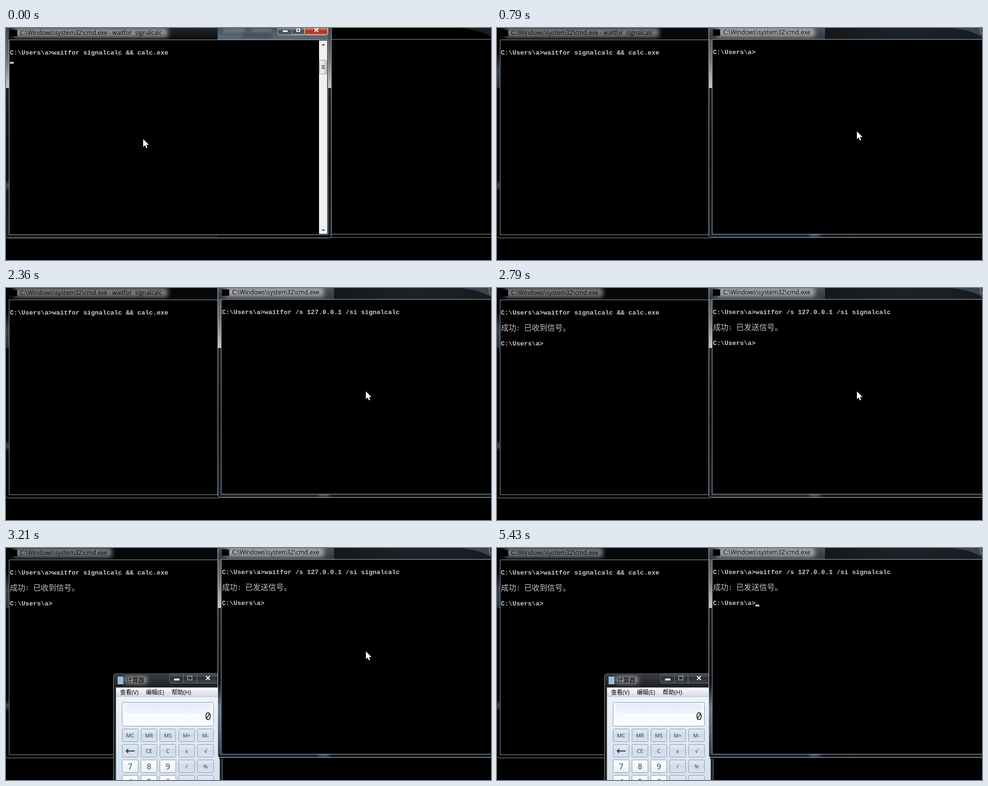
An HTML page with a canvas for the animation above (5480 ms loop, 1004 by 480 pixels).

```html
<!DOCTYPE html>
<html lang="zh-CN">
<head>
<meta charset="utf-8">
<title>waitfor</title>
<style>
html, body { margin: 0; width: 100%; height: 100%; overflow: hidden; background: #000; }
canvas { display: block; }
</style>
</head>
<body>
<canvas id="stage" width="1004" height="480"></canvas>
<script>
const LOOP = 5480;
const FRONT_SWAP = 790, PASTE = 1620, DONE = 2790, CALC_IN = 3070, CALC_FULL = 3210;
const UI = '"Open Sans", "Noto Sans CJK SC", "Noto Sans CJK", sans-serif';
const MONO = 'bold 13.33px "Liberation Mono", monospace';
const CJK = '300 16px "Noto Sans CJK SC", "Noto Sans CJK", sans-serif';

const stage = document.getElementById('stage').getContext('2d');
let g = stage;

function rect(x, y, w, h, fill) {
  g.fillStyle = fill;
  g.fillRect(x, y, w, h);
}

function box(x, y, w, h, r, fill, line) {
  g.beginPath();
  g.roundRect(x + 0.5, y + 0.5, w - 1, h - 1, r);
  if (fill) { g.fillStyle = fill; g.fill(); }
  if (line) { g.strokeStyle = line; g.lineWidth = 1; g.stroke(); }
}

function fade(x0, y0, x1, y1, ...colors) {
  const f = g.createLinearGradient(x0, y0, x1, y1);
  colors.forEach((c, i) => f.addColorStop(i / (colors.length - 1), c));
  return f;
}
const down = (y0, y1, ...colors) => fade(0, y0, 0, y1, ...colors);

function text(s, x, y, font, fill, align = 'left') {
  g.font = font;
  g.fillStyle = fill;
  g.textAlign = align;
  g.fillText(s, x, y);
}

function blur(size, x, y, w, h, fill) {
  g.save();
  g.filter = `blur(${size}px)`;
  rect(x, y, w, h, fill);
  g.restore();
}

function clipped(x, y, w, h, draw) {
  g.save();
  g.beginPath();
  g.rect(x, y, w, h);
  g.clip();
  draw();
  g.restore();
}

function stroke(color, width, ...points) {
  g.beginPath();
  points.forEach(([x, y], i) => i ? g.lineTo(x, y) : g.moveTo(x, y));
  g.strokeStyle = color;
  g.lineWidth = width;
  g.stroke();
}

function cross(x, y, w, h) {
  for (const d of [-1, 1]) stroke('#fff', 2.2, [x - w * d, y - h], [x + w * d, y + h]);
}

const say = (s, x, y) => text(s, x, y, MONO, '#c8c8c8');

function reply(s, x, y) {
  text('成功', x, y, CJK, '#c0c0c0');
  say(':', x + 32, y - 1);
  text(s, x + 48, y, CJK, '#c0c0c0');
}

const caret = (x, y) => rect(x, y, 8, 4, '#c0c0c0');

function caption(s, x, y, end, glow) {
  clipped(0, 0, 1004, 23, () => {
    blur(5, x - 12, y - 15, end - x + 20, 20, glow);
    rect(x - 21, y - 10, 15, 13, '#000');
    text(s, x, y, '12.4px ' + UI, '#000');
  });
}

function captionButtons() {
  box(562, -6, 105, 21, 4, '#3f464c', '#b9bec2');
  box(563, -5, 28, 19, 3, down(0, 14, '#8b9298', '#3d444b', '#66707a'));
  box(591, -5, 27, 19, 0, down(0, 14, '#8b9298', '#3d444b', '#66707a'), '#a2a8ad');
  box(618, -5, 48, 19, 3, down(0, 14, '#d08a7c', '#a92c1c', '#c8553c'), '#d9b0a6');
  box(572, 4, 12, 5, 1, '#fff', '#4a5158');
  box(600, 0, 10, 9, 1, '#fff', '#4a5158');
  rect(603, 3, 4, 3, '#4a5158');
  cross(642.5, 4, 4, 4);
}

function scrollbar() {
  rect(648, 26, 17, 400, '#f0f0f0');
  box(649, 66, 15, 30, 2, fade(649, 0, 664, 0, '#f8f8f8', '#e4e4e4', '#c4c6c8'), '#8d8f91');
  for (let y = 77; y <= 83; y += 3) rect(653, y, 7, 1.5, '#555');
  g.fillStyle = '#333';
  for (const [y, d] of [[36, -3], [417, 3]]) {
    g.beginPath();
    g.moveTo(653, y);
    g.lineTo(661, y);
    g.lineTo(657, y + d);
    g.fill();
  }
}

// Glass side: bright above the horizon of the wallpaper, dark below.
function side(x, w) {
  rect(x, 0, w, 124, down(0, 124, '#42464a', '#6c7073', '#c6c8ca'));
  rect(x, 124, w, 306, down(124, 430, '#1a2129', '#0c1014', '#18212a'));
}

// Wallpaper curve showing through the title bar at the right end.
function swoosh(color) {
  clipped(900, 0, 104, 23, () => {
    g.beginPath();
    g.moveTo(940, 0);
    g.quadraticCurveTo(980, 4, 1004, 18);
    g.lineTo(1004, 0);
    g.fillStyle = color;
    g.fill();
  });
}

function leftWindow(active, done) {
  box(-1, -10, 675, 445, 5, '#050607', active ? '#b4bbc1' : '#8b8d8f');
  rect(0, 0, 673, 24, active ? down(0, 24, '#232629', '#0a0b0c') : '#060708');
  if (active) {
    side(0, 6);
    side(667, 6);
    rect(438, 0, 229, 24, down(0, 24, '#46535f', '#5d6b78'));
    clipped(438, 0, 124, 24, () => {
      blur(3, 450, 2, 45, 5, '#7d8c98');
      blur(3, 490, 13, 60, 6, '#3a4651');
      blur(2, 510, 3, 40, 4, '#71808c');
    });
    rect(3, 429, 435, 5, '#1a1f24');
    rect(438, 429, 232, 5, '#0d1217');
    captionButtons();
  } else {
    rect(0, 50, 6, 74, down(50, 124, '#060708', '#3c444a', '#283037'));
  }
  clipped(0, 310, 6, 34, () => blur(4, -3, 321, 8, 10, '#7d8a99'));
  box(6, 24, 661, 404, 0, '#000', active ? '#a9afb4' : '#98999a');
  if (active) scrollbar();

  caption('C:\\Windows\\system32\\cmd.exe' + (done ? '' : ' - waitfor  signalcalc'),
    29, 14, done ? 211 : 327, active ? '#8f9193' : '#77797b');
  say('C:\\Users\\a>waitfor signalcalc && calc.exe', 8, 55);
  if (done) {
    reply('已收到信号。', 8, 88);
    say('C:\\Users\\a>', 8, 119);
  }
}

function rightWindow(t, active) {
  if (active) rect(441, 434, 563, 2, '#000');
  box(438, -10, 580, 444, 5, '#000', active ? '#c3c9ce' : '#8d8f91');
  if (active) {
    side(439, 6);
    if (t >= CALC_IN) {
      g.globalAlpha = t < CALC_FULL ? 0.4 : 0.7;
      rect(439, 280, 6, 150, down(280, 430, '#8fa6c400', '#8ea5c2', '#667e9c', '#33455a'));
      g.globalAlpha = 1;
    }
    rect(439, 0, 240, 23, down(0, 23, '#4a5056', '#33383d'));
    rect(679, 0, 325, 23, fade(679, 0, 1004, 0, '#14181b', '#1c2227', '#171c21'));
    swoosh('#3c444b');
    rect(442, 427, 232, 6, '#1b2630');
    rect(674, 427, 330, 6, '#111820');
    clipped(600, 427, 110, 6, () => blur(3, 647, 426, 20, 3, '#a0adba'));
    box(1000, -5, 20, 17, 4, '#3c4248', '#b2b7bb');
  } else {
    swoosh('#1b1d1f');
  }
  box(445, 23, 580, 404, 0, '#000', active ? '#aab0b5' : '#96989a');
  if (!active) return;

  caption('C:\\Windows\\system32\\cmd.exe', 468, 13, 650, '#a2a5a8');
  say('C:\\Users\\a>' + (t >= PASTE ? 'waitfor /s 127.0.0.1 /si signalcalc' : ''), 447, 54);
  if (t >= DONE) {
    reply('已发送信号。', 447, 87);
    say('C:\\Users\\a>', 447, 118);
  }
  const on = (a, b) => t >= a && t < b;
  if (on(1220, PASTE)) caret(535, 53);
  if (on(1770, 2360)) caret(815, 53);
  if (on(3330, 3860) || on(4390, 4930) || t >= 5430) caret(535, 117);
}

function key(label, col, row) {
  const x = 240 + col * 39, y = 374 + row * 32;
  const digit = row > 1 && col < 3;
  box(x, y, 34, 27, 2, digit ? down(y, y + 27, '#ffffff', '#e9eff6') :
    down(y, y + 27, '#e4ebf4', '#d0dbe9', '#dae4f0'), '#8797ab');
  if (label === '←') {
    stroke('#1e395b', 2, [x + 9, y + 14], [x + 26, y + 14]);
    stroke('#1e395b', 2, [x + 13, y + 10], [x + 9, y + 14], [x + 13, y + 18]);
  } else {
    text(label, x + 17, y + (digit ? 20 : 18), (digit ? 16 : 11) + 'px ' + UI, '#1e395b', 'center');
  }
}

function drawCalculator() {
  box(222, 260, 226, 320, 5, '#1b1d1f', '#8c9094');
  rect(224, 262, 222, 26, down(262, 288, '#383b3e', '#1c1e20'));
  clipped(224, 262, 114, 26, () => blur(4, 246, 265, 46, 16, '#8c8f91'));
  rect(231, 266, 12, 16, '#8fc0e4');
  text('计算器', 249, 278, '12.4px ' + UI, '#000');

  box(338, 259, 109, 21, 4, '#25282b', '#7a7e82');
  for (const x of [340, 368, 396]) {
    rect(x, 261, x < 396 ? 27 : 48, 17, down(261, 278, '#55595d', '#2b2e31', '#404448'));
  }
  rect(367, 261, 1, 18, '#7a7e82');
  rect(395, 261, 1, 18, '#7a7e82');
  rect(348, 270, 11, 4, '#fff');
  g.strokeStyle = '#85898c';
  g.lineWidth = 2;
  g.strokeRect(376, 265, 9, 8);
  cross(418, 269, 4, 4);

  box(227, 288, 216, 290, 0, '#dde7f3', '#6f767d');
  rect(228, 289, 214, 18, down(289, 307, '#ffffff', '#e6eaf4', '#d3daea'));
  rect(228, 307, 214, 1, '#b7c0d0');
  rect(228, 308, 214, 200, down(308, 480, '#edf3fa', '#dfe8f3', '#d4e0ee'));
  ['查看(V)', '编辑(E)', '帮助(H)'].forEach((s, i) =>
    text(s, 236 + i * 53.5, 303, '12px ' + UI, '#000'));

  box(240, 319, 190, 50, 2, down(319, 369, '#f3f7fc', '#fbfdff'), '#8a99ac');
  box(245, 321, 180, 21, 9, down(321, 342, '#e4ecf7', '#eef3fb'));
  text('0', 425, 356, '22px "Noto Sans Mono", monospace', '#222', 'right');

  [
    ['MC', 'MR', 'MS', 'M+', 'M-'],
    ['←', 'CE', 'C', '±', '√'],
    ['7', '8', '9', '/', '%'],
    ['4', '5', '6', '*', '1/x']
  ].forEach((line, row) => line.forEach((label, col) => key(label, col, row)));
}

const calcLayer = document.createElement('canvas');
calcLayer.width = 240;
calcLayer.height = 260;
g = calcLayer.getContext('2d');
g.translate(-216, -250);
drawCalculator();
g = stage;

function calculator(t) {
  if (t < CALC_IN) return;
  g.save();
  if (t < CALC_FULL) {
    g.globalAlpha = 0.74;
    g.translate(335, 370);
    g.scale(0.97, 0.973);
    g.translate(-335, -370);
  }
  g.drawImage(calcLayer, 216, 250);
  g.restore();
}

// Pointer stops: time, x, y
const STOPS = [
  [0, 283, 230], [130, 458, 224], [250, 622, 214], [400, 744, 214],
  [4390, 876, 320], [4540, 926, 392], [4660, 960, 452], [4780, 980, 500]
];
const ARROW = [[1, 0], [1, 16], [4.7, 12.6], [7.3, 18.4], [9.8, 17.3], [7.2, 11.7], [12.6, 11.6]];

function pointer(t) {
  const [, x, y] = STOPS.findLast(s => s[0] <= t);
  g.beginPath();
  ARROW.forEach(([dx, dy]) => g.lineTo(x + dx, y + dy));
  g.closePath();
  g.strokeStyle = '#000';
  g.lineWidth = 1.4;
  g.stroke();
  g.fillStyle = '#fff';
  g.fill();
}

function draw(t) {
  rect(0, 0, 1004, 480, '#000');
  if (t < FRONT_SWAP) {
    rightWindow(t, false);
    leftWindow(true, false);
    if (t < 250) caret(8, 70);
  } else {
    leftWindow(false, t >= DONE);
    calculator(t);
    rightWindow(t, true);
  }
  pointer(t);
}

let start;
function tick(now) {
  start ??= now;
  draw((now - start) % LOOP);
  requestAnimationFrame(tick);
}
requestAnimationFrame(tick);
</script>
</body>
</html>
```
